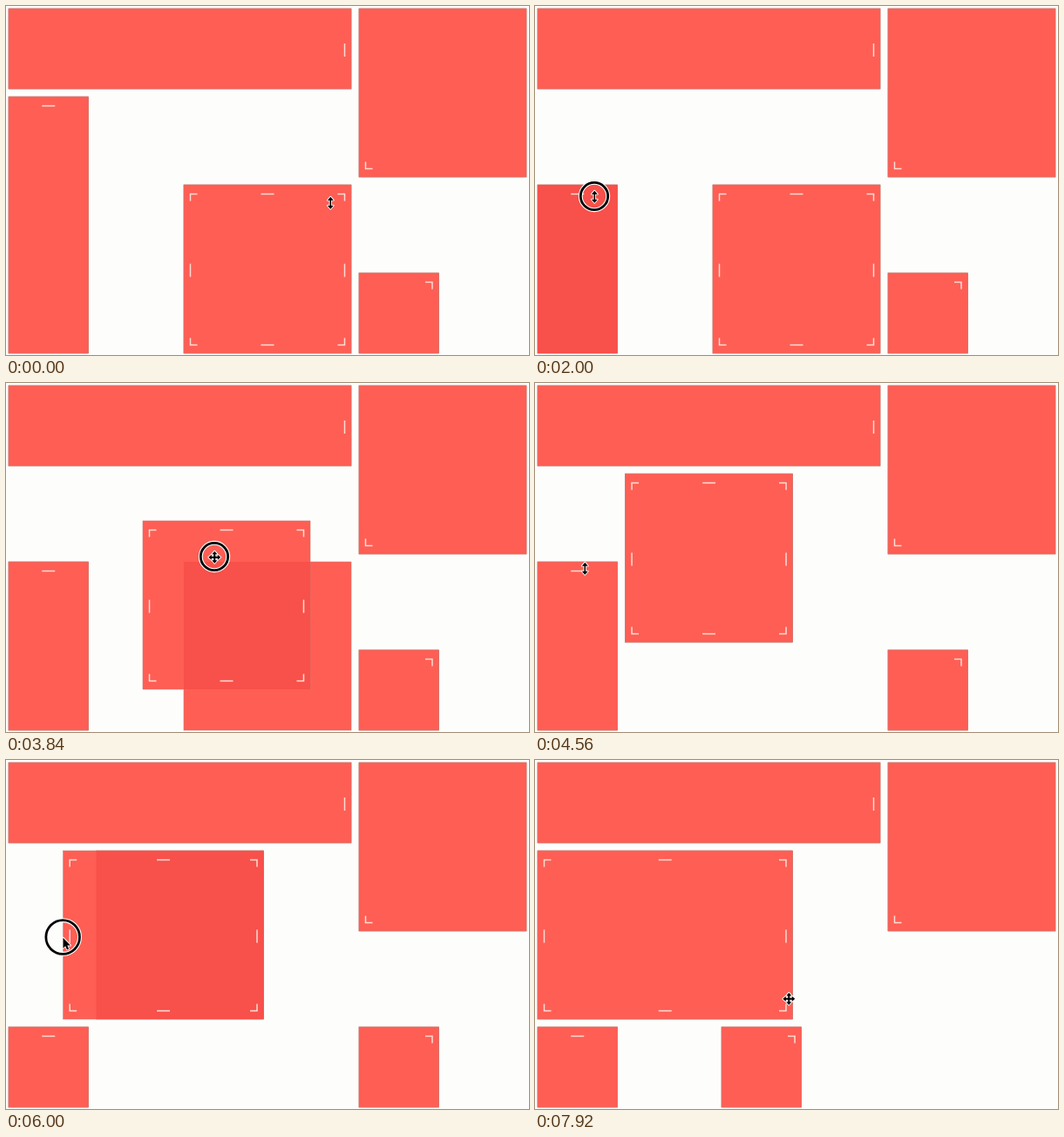
These frames come from a looping animation (600 px wide and 400 px high, 8 s). An HTML page:

```html
<!DOCTYPE html>
<html lang="en">
<head>
<meta charset="utf-8">
<title>Resizable grid</title>
<style>
  html, body { margin: 0; width: 100%; height: 100%; overflow: hidden; background: #fdfdfc; }
  svg { display: block; width: 600px; height: 400px; }
  .tile { fill: #ff5e54; stroke: #c9756c; stroke-width: .6; }
  .overlap { fill: #f8504a; }
  .grip { fill: none; stroke: #ffdcd4; stroke-width: 1.5; }
  .cursor { fill: #000; stroke: #fff; stroke-width: 1.8; paint-order: stroke; stroke-linejoin: round; }
  .ring { fill: none; }
</style>
</head>
<body>
<svg id="stage" viewBox="0 0 600 400"></svg>
<script>
const LOOP = 8000, STEP = 80;
const COL = 100.5, ROW = 101, GAP = 9, EDGE = 3;
const DRAG = 560, HOLD = 80, SETTLE = 380;   // phases of every gesture, in ms
const PRESS_LEAD = 120, REST = 40;
const stage = document.getElementById('stage');

function add(name, attrs) {
  const el = document.createElementNS('http://www.w3.org/2000/svg', name);
  return set(stage.appendChild(el), attrs);
}

function set(el, attrs) {
  for (const key in attrs) el.setAttribute(key, attrs[key]);
  return el;
}

const cellBox = (col, row, cols, rows) =>
  [EDGE + col * COL, EDGE + row * ROW, cols * COL - GAP, rows * ROW - GAP];

function tile(cells, grips) {
  return {
    home: cellBox(...cells),
    grips: grips.split(' '),
    slotEl: add('rect', { class: 'tile' }),
    boxEl: add('rect', { class: 'tile' }),
    overlapEl: add('rect', { class: 'overlap' }),
    gripEl: add('path', { class: 'grip' })
  };
}

const banner = tile([0, 0, 4, 1], 'r');
const corner = tile([4, 0, 2, 2], 'bl');
const column = tile([0, 1, 1, 3], 't');
const small = tile([4, 3, 1, 1], 'tr');
const panel = tile([2, 2, 2, 2], 'tl t tr l r bl b br');
const tiles = [banner, corner, column, small, panel];

const gestures = [
  { start: 1400, tile: column, mode: 'top', grab: [68, 117], by: [0, ROW] },
  { start: 3560, tile: panel, mode: 'move', grab: [286, 246], by: [-94, -94] },
  { start: 4720, tile: column, mode: 'top', grab: [57, 212], by: [0, ROW] },
  { start: 5755, tile: panel, mode: 'left', grab: [103, 203], by: [-93, 0] },
  { start: 7030, tile: small, mode: 'move', grab: [440, 345], by: [-164, 0] }
];

// The pointer travels to each grab point, drags, and rests a moment after release.
const stops = [[0, 372, 225]];
for (const g of gestures) {
  const [x, y] = g.grab, [dx, dy] = g.by;
  g.press = g.start - PRESS_LEAD;
  g.release = g.start + DRAG + HOLD;
  stops.push([g.press - REST, x, y], [g.start, x, y],
    [g.start + DRAG, x + dx, y + dy], [g.release + REST, x + dx, y + dy]);
}
stops.push([LOOP - STEP, 291, 273]);

const shapes = {
  ns: 'M0-7 3.5-3H.8V3H3.5L0 7-3.5 3H-.8V-3H-3.5Z',
  move: 'M0-7 3-3.5H1V-1H3.5V-3L7 0 3.5 3V1H1V3.5H3L0 7-3 3.5H-1V1H-3.5V3L-7 0-3.5-3V-1H-1V-3.5H-3Z',
  arrow: 'M0 0V12L2.7 9.5 4.6 13.7 6.6 12.8 4.8 8.8H8.5Z'
};

function ease(u) {
  u = Math.min(1, Math.max(0, u));
  return u * u * (3 - 2 * u);
}

const mix = (a, b, u) => a.map((v, i) => v + (b[i] - v) * u);

function pointerAt(t) {
  const i = Math.max(1, stops.findIndex(stop => stop[0] >= t));
  const [from, ...a] = stops[i - 1], [to, ...b] = stops[i];
  return mix(a, b, ease((t - from) / (to - from)));
}

function pull([x, y, w, h], mode, dx, dy) {
  if (mode === 'top') return [x, y + dy, w, h - dy];
  if (mode === 'left') return [x + dx, y, w - dx, h];
  return [x + dx, y + dy, w, h];
}

function snap([x, y, w, h]) {
  return cellBox(
    Math.round((x - EDGE) / COL), Math.round((y - EDGE) / ROW),
    Math.round((w + GAP) / COL), Math.round((h + GAP) / ROW)
  );
}

function layout(item, t) {
  let box = item.home;
  for (const g of gestures) {
    if (g.tile !== item || t < g.start) continue;
    const u = ease((t - g.start) / DRAG);
    const pulled = pull(box, g.mode, g.by[0] * u, g.by[1] * u);
    if (t < g.release) return { box: pulled, slot: snap(pulled), held: true };
    box = mix(pulled, snap(pulled), ease((t - g.release) / SETTLE));
  }
  return { box, slot: box, held: false };
}

function intersect(a, b) {
  const x = Math.max(a[0], b[0]), y = Math.max(a[1], b[1]);
  const right = Math.min(a[0] + a[2], b[0] + b[2]);
  const bottom = Math.min(a[1] + a[3], b[1] + b[3]);
  return [x, y, Math.max(0, right - x), Math.max(0, bottom - y)];
}

function place(el, [x, y, width, height]) {
  set(el, { x, y, width, height });
}

function gripPath(grips, [x, y, w, h]) {
  const left = x + 7.5, right = x + w - 7.5;
  const top = y + 10.5, bottom = y + h - 9.5;
  const midX = x + w / 2 - 7.5, midY = y + h / 2 - 6;
  const paths = {
    tl: `M${left} ${top + 8}v-8h8`,
    tr: `M${right} ${top + 8}v-8h-8`,
    bl: `M${left} ${bottom - 8}v8h8`,
    br: `M${right} ${bottom - 8}v8h-8`,
    t: `M${midX} ${top}h15`,
    b: `M${midX} ${bottom}h15`,
    l: `M${left} ${midY}v15`,
    r: `M${right} ${midY}v15`
  };
  return grips.map(name => paths[name]).join('');
}

function cursorKind(x, y) {
  const under = tiles.find(({ box: [left, top, w, h] }) =>
    x > left && x < left + w && y > top && y < top + h);
  if (!under) return 'arrow';
  return under.grips.includes('t') && y - under.box[1] < 22 ? 'ns' : 'move';
}

const halo = add('circle', { class: 'ring', stroke: '#fff', 'stroke-width': 5 });
const ring = add('circle', { class: 'ring', stroke: '#000', 'stroke-width': 2.8 });
const cursor = add('path', { class: 'cursor' });

function draw(t) {
  for (const item of tiles) {
    const { box, slot, held } = layout(item, t);
    item.box = box;
    place(item.slotEl, slot);
    place(item.boxEl, box);
    place(item.overlapEl, held ? intersect(box, slot) : [0, 0, 0, 0]);
    set(item.gripEl, { d: gripPath(item.grips, box) });
  }

  const [x, y] = pointerAt(t);
  const kind = cursorKind(x, y);
  set(cursor, { d: shapes[kind], transform: `translate(${x + 0.3} ${y + 0.7})` });

  const pressed = gestures.some(g => t >= g.press && t < g.release);
  const display = pressed ? 'inline' : 'none';
  const r = kind === 'arrow' ? 19.3 : 15.7;
  for (const el of [halo, ring]) set(el, { cx: x, cy: y, r, display });
}

const start = performance.now();
function tick() {
  const t = (performance.now() - start) % LOOP;
  draw(Math.floor(t / STEP) * STEP);
  requestAnimationFrame(tick);
}
tick();
</script>
</body>
</html>
```
